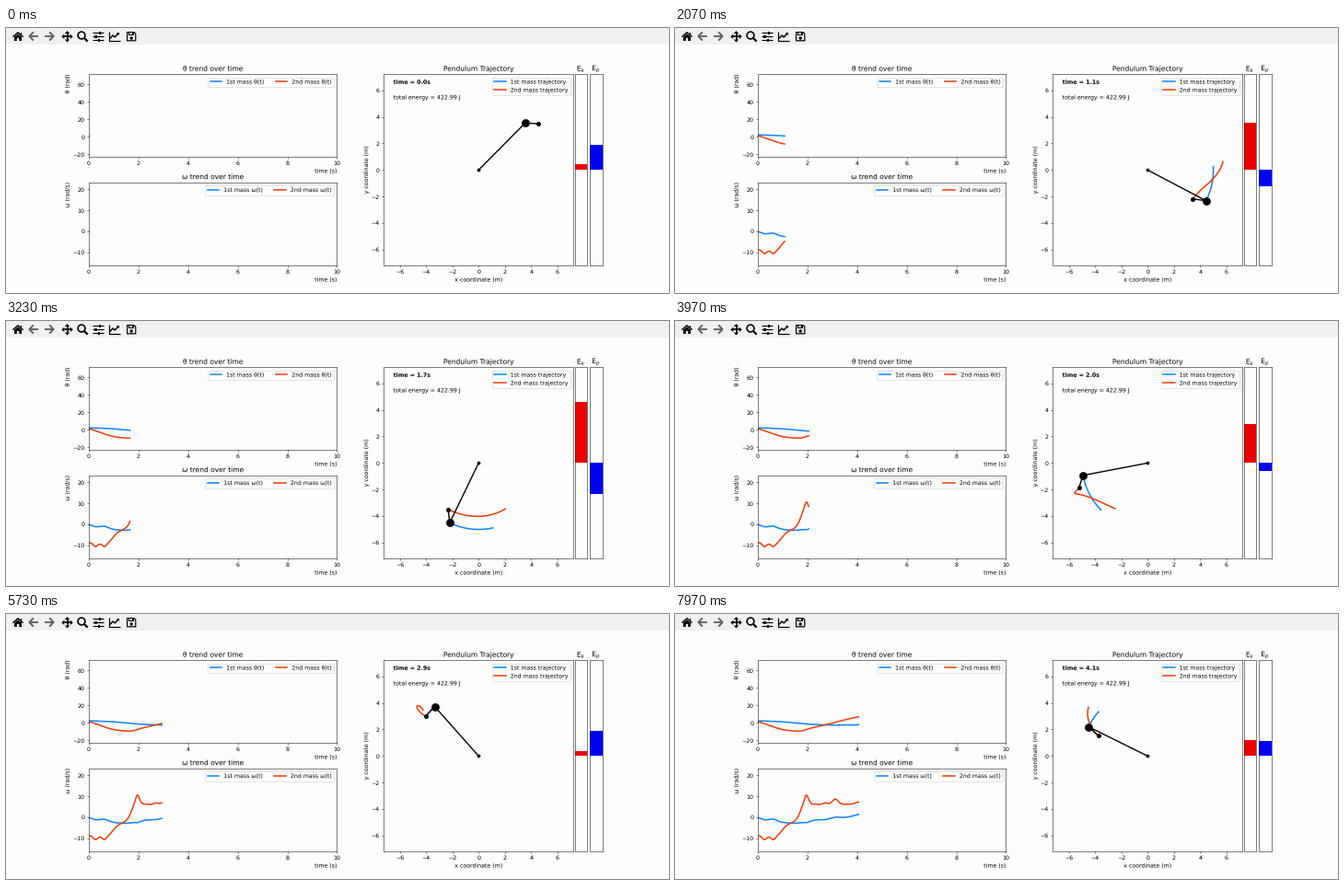
Animation of 720 by 288 pixels, one loop 8 s. Source, as a matplotlib script:

```python
import numpy as np
import matplotlib.pyplot as plt
from matplotlib.animation import FuncAnimation
from matplotlib.patches import Circle, Polygon, Rectangle
from matplotlib.patheffects import Normal

W, H, DPI = 720, 288, 45
FRAMES, STEP = 250, 32
PAPER, BAR = "#fdfdfe", "#f0f0f0"
BLUE, RED = "#1485f5", "#eb4010"
LINE = 2.5

plt.rcParams["text.hinting"] = "none"

# Double pendulum
M1, M2, L1, L2, G = 8.0, 2.0, 5.0, 1.0, 9.81
DT, T_END = 0.001, 4.2
TAIL1, TAIL2 = 250, 375


def slope(s):
    a, b, u, v = s
    d = a - b
    den = 2 * M1 + M2 - M2 * np.cos(2 * d)
    du = (-G * (2 * M1 + M2) * np.sin(a) - M2 * G * np.sin(a - 2 * b)
          - 2 * np.sin(d) * M2 * (v * v * L2 + u * u * L1 * np.cos(d))) / (L1 * den)
    dv = 2 * np.sin(d) * (u * u * L1 * (M1 + M2) + G * (M1 + M2) * np.cos(a)
                          + v * v * L2 * M2 * np.cos(d)) / (L2 * den)
    return np.array([u, v, du, dv])


def simulate():
    s = np.radians([135.0, 90.0, 0.0, -500.0])
    out = [s]
    for _ in range(int(T_END / DT)):
        k1 = slope(s)
        k2 = slope(s + DT / 2 * k1)
        k3 = slope(s + DT / 2 * k2)
        k4 = slope(s + DT * k3)
        s = s + DT / 6 * (k1 + 2 * k2 + 2 * k3 + k4)
        out.append(s)
    return np.array(out).T


th1, th2, om1, om2 = simulate()
times = np.arange(len(th1)) * DT
x1, y1 = L1 * np.sin(th1), -L1 * np.cos(th1)
x2, y2 = x1 + L2 * np.sin(th2), y1 - L2 * np.cos(th2)
e_pot = G * (M1 * y1 + M2 * y2)
e_tot = e_pot[0] + 0.5 * M2 * (L2 * om2[0]) ** 2
e_kin = e_tot - e_pot

fig = plt.figure(figsize=(W / DPI, H / DPI), dpi=DPI, facecolor=PAPER)


def panel(left, top, right, bottom):
    ax = fig.add_axes([left / W, 1 - bottom / H, (right - left) / W, (bottom - top) / H])
    ax.set_facecolor(PAPER)
    return ax


def smooth(*texts):
    """Draw texts as outlines, placed to a fraction of a pixel."""
    for text in texts:
        text.set_path_effects([Normal()])


def finish(ax, ncol):
    legend = ax.legend(loc="upper right", ncol=ncol)
    smooth(ax.title, ax.xaxis.label, ax.yaxis.label, *legend.get_texts())


def trend(top, bottom, sym, unit, ylim, yticks):
    ax = panel(90, top, 359.4, bottom)
    ax.set(xlim=(0, 10), ylim=ylim, yticks=yticks, title=f"{sym} trend over time")
    ax.set_xlabel("time (s)", loc="right")
    ax.set_ylabel(f"{sym} ({unit})", loc="top")
    lines = [ax.plot([], [], color=c, lw=LINE, label=f"{n} mass {sym}(t)")[0]
             for c, n in ((BLUE, "1st"), (RED, "2nd"))]
    finish(ax, 2)
    return lines


def gauge(left, right, name, color):
    ax = panel(left, 50.4, right, 258.3)
    ax.set(xlim=(0, 1), ylim=(-1320, 1320), xticks=[], yticks=[], title=f"E$_{name}$")
    smooth(ax.title)
    return ax.add_patch(Rectangle((0, 0), 1, 0, color=color, lw=0))


def toolbar():
    ax = fig.add_axes([0, 0, 1, 1])
    ax.set(xlim=(0, W), ylim=(H, 0))
    ax.axis("off")
    ink, grey = "black", "#626262"

    def poly(pts, color=ink):
        ax.add_patch(Polygon(pts, color=color, lw=0))

    def box(x, y, w, h, color=ink):
        ax.add_patch(Rectangle((x, y), w, h, color=color, lw=0))

    def stroke(xs, ys, color=ink, lw=2.2):
        ax.plot(xs, ys, color=color, lw=lw, solid_capstyle="butt")

    box(0, 0, W, 18.4, BAR)
    # home
    stroke([7.4, 13, 18.6], [9.6, 4.8, 9.6])
    poly([(9, 9.6), (13, 6.3), (17, 9.6), (17, 14), (14.2, 14), (14.2, 10.8),
          (11.8, 10.8), (11.8, 14), (9, 14)])
    box(15.6, 4.8, 1.4, 3)
    # back and forward
    for x, d in ((30, -1), (47, 1)):
        stroke([x - 5 * d, x + 4 * d], [9, 9], grey, 3)
        stroke([x + 0.2 * d, x + 4.6 * d, x + 0.2 * d], [4.4, 9, 13.6], grey, 3.2)
    # pan
    stroke([62, 71], [9.3, 9.3], lw=2.6)
    stroke([66.5, 66.5], [4.8, 13.8], lw=2.6)
    for dx, dy in ((1, 0), (-1, 0), (0, 1), (0, -1)):
        tip = np.array([66.5 + 6.2 * dx, 9.3 + 6.2 * dy])
        back = tip - 2.9 * np.array([dx, dy])
        side = 2.7 * np.array([dy, dx])
        poly([tip, back + side, back - side])
    # zoom
    ax.add_patch(Circle((82, 8), 3.9, fill=False, ec=ink, lw=2.6))
    stroke([84.8, 88.6], [10.8, 14.6], lw=3.6)
    # sliders
    for y, x in ((5.4, 102), (9.4, 97.5), (13.4, 101)):
        stroke([94, 106], [y, y], lw=1.8)
        box(x - 1.1, y - 1.7, 2.2, 3.4)
    # chart
    stroke([111.6, 111.6, 123.6], [4, 13.6, 13.6], lw=1.9)
    stroke([113, 116, 118.2, 122], [11.4, 8, 9.9, 5.8], lw=2.4)
    poly([(119.6, 4.6), (123.2, 4.6), (123.2, 8.2)])
    # save
    poly([(131, 4), (139.4, 4), (141.4, 6), (141.4, 14.4), (131, 14.4)])
    poly([(132.2, 5.2), (138.9, 5.2), (140.2, 6.5), (140.2, 13.2), (132.2, 13.2)], BAR)
    box(133, 4.8, 5.6, 3.6)
    box(134, 5.2, 3.4, 2.1, BAR)
    ax.add_patch(Circle((136.2, 11), 1.7, color=ink, lw=0))


toolbar()
th_lines = trend(50.4, 140.2, "θ", "rad", (-22.9, 71.4), range(-20, 61, 20))
om_lines = trend(167.9, 258.3, "ω", "rad/s", (-16.2, 23.2), range(-10, 21, 10))

ax = panel(410.4, 50.4, 616.1, 258.3)
ticks = range(-6, 7, 2)
ax.set(xlim=(-7.2, 7.2), ylim=(-7.2, 7.2), xticks=ticks, yticks=ticks,
       title="Pendulum Trajectory", xlabel="x coordinate (m)", ylabel="y coordinate (m)")
trails = [ax.plot([], [], color=c, lw=LINE, label=f"{n} mass trajectory")[0]
          for c, n in ((BLUE, "1st"), (RED, "2nd"))]
rod, = ax.plot([], [], "k-", lw=2.2)
ax.plot(0, 0, "ko", ms=5)
bob1, = ax.plot([], [], "ko", ms=13)
bob2, = ax.plot([], [], "ko", ms=7)
finish(ax, 1)
clock = ax.text(0.05, 0.95, "", weight="bold", transform=ax.transAxes)
energy = ax.text(0.05, 0.87, f"total energy = {e_tot:.2f} J", transform=ax.transAxes)
smooth(clock, energy)

kin_bar = gauge(618.4, 631.4, "k", "#ec0000")
pot_bar = gauge(634.4, 648.0, "p", "#0000fa")


def sim_time(sec):
    """About half speed, slightly quicker at the start."""
    return 0.006 + 0.503 * sec + 0.046 * (1 - np.exp(-sec))


def draw(k):
    t = sim_time(k * STEP / 1000)
    i = int(round(t / DT))
    now = i + 1
    for line, data in zip(th_lines + om_lines, (th1, th2, om1, om2)):
        line.set_data(times[:now], data[:now])
    for line, x, y, tail in zip(trails, (x1, x2), (y1, y2), (TAIL1, TAIL2)):
        part = slice(max(0, i - tail), now)
        line.set_data(x[part], y[part])
    rod.set_data([0, x1[i], x2[i]], [0, y1[i], y2[i]])
    bob1.set_data([x1[i]], [y1[i]])
    bob2.set_data([x2[i]], [y2[i]])
    clock.set_text(f"time = {t:.1f}s")
    kin_bar.set_height(e_kin[i])
    pot_bar.set_height(e_pot[i])


anim = FuncAnimation(fig, draw, frames=FRAMES, interval=STEP, repeat=True,
                     repeat_delay=0, cache_frame_data=False)
plt.show()
```
